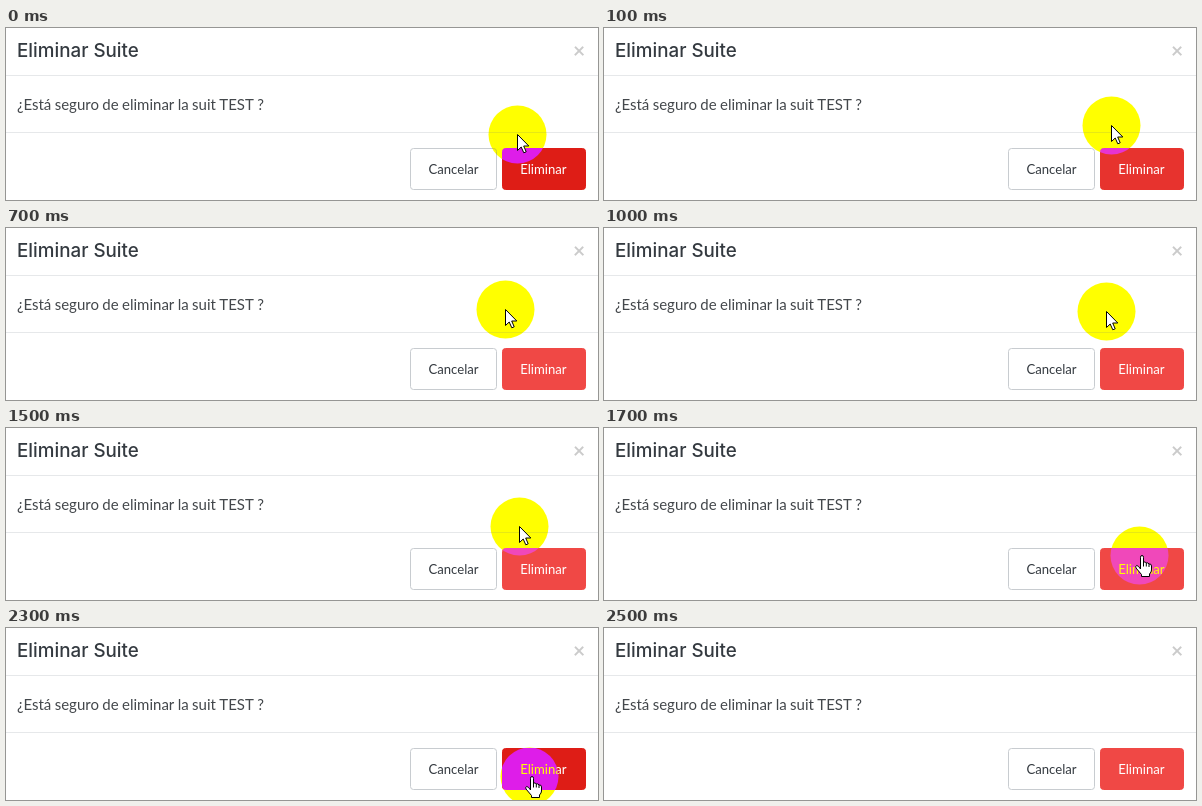
These frames come from a looping animation (592x172 px, 2800 ms). An HTML page with a canvas:

```html
<!DOCTYPE html>
<html lang="es">
<head>
<meta charset="utf-8">
<title>Eliminar Suite</title>
<style>
html, body { margin: 0; width: 592px; height: 172px; overflow: hidden; background: #fff; }
canvas { display: block; }
</style>
</head>
<body>
<canvas id="stage" width="592" height="172"></canvas>
<script>
const ctx = document.getElementById("stage").getContext("2d");
const LOOP = 2800, STEP = 100, RADIUS = 29;
const LATO = "Lato, 'Open Sans', sans-serif";

const home = { x: 511, y: 106 };
const moves = [
  { from: 0, to: 300, x: 498, y: 80 },
  { from: 600, to: 1000, x: 502, y: 83 },
  { from: 1400, to: 1700, x: 535, y: 127 },
  { from: 1700, to: 2000, x: 535, y: 131 },
  { from: 2200, to: 2500, x: 500, y: 182 }
];
const ENTER = 1700, LEAVE = 2300, GONE = 2500, FADE = 200;

const arrow = new Path2D("M.5 .5V16.5L4.2 13 6.8 18.8 9.2 17.8 6.7 12H11.8Z");
const hand = new Path2D("M5.5 14V2.3Q5.5 .5 7 .5T8.5 2.3V7.2Q10.5 6.2 11.2 8 13.2 7.2 14 9 16.5 8.6 16.5 11V15Q16.5 17 14.5 19V21.5H6.5V19.5L1 13Q0 11 1.8 10.5 3.3 10.5 5.5 14Z");
const fingers = new Path2D("M8.5 7V11.5M11.3 8V11.5M14 9V12");

const mix = (a, b, k) => a + (b - a) * k;
const ramp = (t, from, to) => Math.min(1, Math.max(0, (t - from) / (to - from)));

function pointerAt(t) {
  let { x, y } = home;
  for (const m of moves) {
    const k = ramp(t, m.from, m.to);
    x = mix(x, m.x, k);
    y = mix(y, m.y, k);
  }
  return [Math.round(x), Math.round(y)];
}

// the loop opens with the button fading out of its hover state
function hoverAt(t) {
  const fade = at => ramp(t, at, at + FADE);
  return 1 - fade(0) + fade(ENTER) - fade(LEAVE);
}

function text(str, x, y, font, color, align = "left") {
  ctx.font = font;
  ctx.fillStyle = color;
  ctx.textAlign = align;
  ctx.fillText(str, x, y);
}

function box(x, y, w, h, fill, stroke) {
  ctx.beginPath();
  ctx.roundRect(x + 0.5, y + 0.5, w - 1, h - 1, 3);
  ctx.fillStyle = fill;
  ctx.fill();
  ctx.strokeStyle = stroke;
  ctx.lineWidth = 1;
  ctx.stroke();
}

function drawDialog(hover) {
  ctx.fillStyle = "#fff";
  ctx.fillRect(0, 0, 592, 172);
  ctx.fillStyle = "#e6e8ea";
  ctx.fillRect(0, 47, 592, 1);
  ctx.fillRect(0, 104, 592, 1);

  text("Eliminar Suite", 11, 29, "500 18.8px Inter, sans-serif", "#343a40");
  text("×", 573, 30, "700 21px " + LATO, "#cbcbcb", "center");
  ctx.wordSpacing = "-0.45px";
  text("¿Está seguro de eliminar la suit TEST ?", 11, 82, "15px " + LATO, "#43474b");
  ctx.wordSpacing = "0px";

  box(404, 120, 87, 42, "#fff", "#c8ccd0");
  text("Cancelar", 447.5, 146, "13.125px " + LATO, "#343a40", "center");

  const red = `rgb(${mix(240, 222, hover)}, ${mix(72, 29, hover)}, ${mix(69, 22, hover)})`;
  box(496, 120, 84, 42, red, red);
  text("Eliminar", 537.4, 146, "13.125px " + LATO, "#fff", "center");
}

function drawPointer(x, y, isHand) {
  // the halo inverts the blue channel beneath it
  ctx.globalCompositeOperation = "difference";
  ctx.fillStyle = "#00f";
  ctx.beginPath();
  ctx.arc(x + 0.5, y + 0.5, RADIUS, 0, Math.PI * 2);
  ctx.fill();
  ctx.globalCompositeOperation = "source-over";

  const shape = isHand ? hand : arrow;
  ctx.save();
  ctx.translate(x - (isHand ? 4 : 0), y);
  ctx.lineWidth = 1;
  ctx.lineJoin = "round";
  ctx.fillStyle = "#fff";
  ctx.strokeStyle = "#000";
  ctx.fill(shape);
  ctx.stroke(shape);
  if (isHand) ctx.stroke(fingers);
  ctx.restore();
}

function draw(t) {
  drawDialog(hoverAt(t));
  if (t < GONE) drawPointer(...pointerAt(t), t >= ENTER && t <= LEAVE);
}

const start = performance.now();
function tick() {
  const t = (performance.now() - start) % LOOP;
  draw(Math.floor(t / STEP) * STEP);
  requestAnimationFrame(tick);
}
tick();
</script>
</body>
</html>
```
